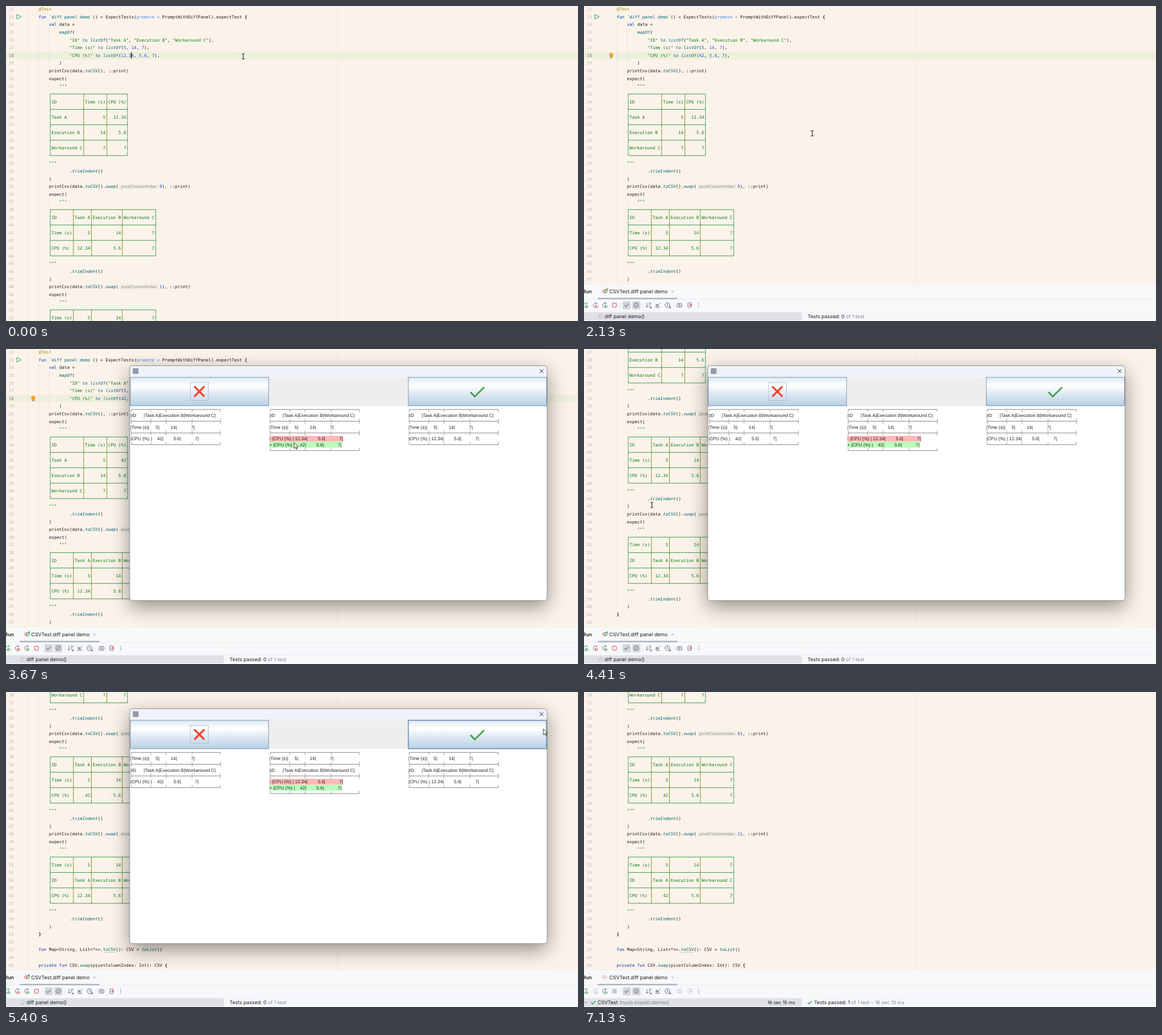
Recreate the animation shown at these times as an HTML page with a canvas. Size 1008 by 556 pixels, loop 7.64 s.

```html
<!DOCTYPE html>
<html lang="en">
<head>
<meta charset="utf-8">
<title>Diff panel demo</title>
<style>
html, body { margin: 0; width: 100%; height: 100%; overflow: hidden; background: #fbf3e9; }
canvas { display: block; width: 1008px; height: 556px; }
</style>
</head>
<body>
<canvas id="stage" width="1008" height="556"></canvas>
<script>
const ctx = document.getElementById('stage').getContext('2d');
const LOOP = 7640, W = 1008, H = 556;
const CW = 4.536, LH = 13.61, X0 = 39.4;
const MONO = '7.535px "DejaVu Sans Mono", monospace';
const UI = '8.75px Inter, sans-serif';
const ARIAL = '8.05px "Liberation Sans", Arial, sans-serif';
const INK = '#1b1b1b', GREEN = '#067d17', TEAL = '#00627a', BLUE = '#0033b3', GRAY = '#818594';
const RUN = '#3a9a56', RED = '#e0434f', ICON = '#6c707e', PALE = '#c4c7d0';

// timeline marks in ms
const MENU = 1150, LAUNCH = 1520, PANEL = 1600, DONE = 6480, SCROLL = 4140;
const DIALOGS = [
  { open: 2400, close: 3060, h: 49.5 },
  { open: 3120, close: 5210, h: 51, drag: [4690, 4890, 133, -5.7] },
  { open: 5400, close: 6400, h: 51, drag: [5560, 5750, 160, -8.7] },
];
const EDITS = ['12.3', '12.', '12', '1', '', '4', '42'];
const MOUSE = [
  [700, 250, 505], [1000, 60, 75], [1120, 20, 18], [1220, 21, 19], [1380, 39, 26], [1520, 39, 26],
  [2250, 430, 240], [2740, 759, 92], [2930, 828, 74], [3320, 828, 74],
  [4070, 119.5, 275.5], [4480, 119.5, 275.5], [4690, 560, 37], [4890, 693, 31],
  [5080, 947, 65], [5400, 947, 65], [5560, 618.5, 35.2], [5750, 778.5, 26.5],
  [5850, 778.5, 26.5], [6200, 985, 64], [6450, 985, 64], [6950, 822, 338], [7130, 990, 560],
];
const PRESSES = [[1140, 1210], [1450, 1520], [2985, 3060], [4690, 4890], [5140, 5210], [5560, 5800], [6330, 6400]];

const clamp = (v, a, b) => Math.max(a, Math.min(b, v));
const ease = p => p * p * (3 - 2 * p);
const within = (t, a, b) => t >= a && t < b;

function text(s, x, y, font, color, align = 'left') {
  ctx.font = font;
  ctx.fillStyle = color;
  ctx.textAlign = align;
  ctx.fillText(s, x, y);
  return ctx.measureText(s).width;
}
function rect(x, y, w, h, color) {
  ctx.fillStyle = color;
  ctx.fillRect(x, y, w, h);
}
function round(x, y, w, h, r, fill, stroke) {
  ctx.beginPath();
  ctx.roundRect(x, y, w, h, r);
  if (fill) { ctx.fillStyle = fill; ctx.fill(); }
  if (stroke) { ctx.strokeStyle = stroke; ctx.lineWidth = 1; ctx.stroke(); }
}
function shape(points, color, width = 1, fill, closed) {
  ctx.beginPath();
  points.forEach(([x, y], i) => i ? ctx.lineTo(x, y) : ctx.moveTo(x, y));
  if (closed) ctx.closePath();
  if (fill) { ctx.fillStyle = fill; ctx.fill(); }
  if (color) { ctx.strokeStyle = color; ctx.lineWidth = width; ctx.stroke(); }
}
function arc(x, y, r, color, width = 1, a = 0, b = Math.PI * 2) {
  ctx.beginPath();
  ctx.arc(x, y, r, a, b);
  ctx.strokeStyle = color;
  ctx.lineWidth = width;
  ctx.stroke();
}
function disc(x, y, r, color) {
  ctx.beginPath();
  ctx.arc(x, y, r, 0, Math.PI * 2);
  ctx.fillStyle = color;
  ctx.fill();
}
function shadowed(color, blur, dy, draw) {
  ctx.save();
  ctx.shadowColor = color;
  ctx.shadowBlur = blur;
  ctx.shadowOffsetY = dy;
  draw();
  ctx.restore();
}
const play = (x, y, s, color, fill) =>
  shape([[x - s * .8, y - s], [x + s, y], [x - s * .8, y + s]], color, 1, fill, true);
const tick = (x, y, s, color, w) =>
  shape([[x - s, y], [x - s * .3, y + s * .7], [x + s, y - s * .65]], color, w);

// ---- tables ----
function rowsOf(kind, cpu) {
  const rows = [['ID', 'Task A', 'Execution B', 'Workaround C'],
    ['Time (s)', '5', '14', '7'], ['CPU (%)', cpu, '5.6', '7']];
  if (kind === 0) return rows[0].map((_, c) => rows.map(r => r[c]));
  return kind === 1 ? rows : [rows[1], rows[0], rows[2]];
}
function layout(kind, cpu) {
  const rows = rowsOf(kind, cpu);
  const widths = rows[0].map((_, c) => Math.max(...rows.map(r => r[c].length)));
  const bars = [0];
  widths.forEach(w => bars.push(bars[bars.length - 1] + w + 1));
  const lines = rows.map(r => r.map((s, c) => c ? s.padStart(widths[c]) : s.padEnd(widths[c])));
  return { lines, bars };
}

// ---- editor ----
const yOf = n => 5.5 + (n - 12) * LH;
const TOKENS = /"""|"[^"]*"|`[^`]*`|@\w+|promote =|\b(?:fun|val|private)\b|\b(?:to|listOf|mapOf|toCSV|swap|trimIndent|toList)\b|\b\d[\d.]*|[{}]|[^"`@{}\w]+|\w+/g;

function style(tok, upright) {
  if (tok[0] === '"') return [GREEN, ''];
  if (tok[0] === '`') return [TEAL, ''];
  if (tok[0] === '@') return ['#9e880d', ''];
  if (tok === 'promote =') return ['#4a86e8', ''];
  if (/^(fun|val|private)$/.test(tok)) return [BLUE, ''];
  if (/^(to|listOf|mapOf|toCSV|swap|trimIndent|toList)$/.test(tok)) return [TEAL, upright ? '' : 'italic '];
  if (/^\d/.test(tok)) return ['#1750eb', ''];
  return [INK, /[{}]/.test(tok) ? 'bold ' : ''];
}
function code(n, col, s, x = X0 + col * CW) {
  const y = yOf(n) + 2.7, declares = /^(private )?fun /.test(s);
  for (const { 0: tok, index } of s.matchAll(TOKENS)) {
    const upright = declares && s[index - 1] === '.';
    const [color, face] = style(tok, upright);
    const tx = x + index * CW;
    text(tok, tx, y, face + MONO, color);
    if (upright && tok === 'toCSV') rect(tx, y + 2, 5 * CW, .6, '#9ab0b0');
  }
}
function codeTable(n, { lines, bars }) {
  const xs = bars.map(b => X0 + (8.5 + b) * CW), last = lines.length * 2;
  for (let k = 0; k <= last; k++) {
    const y = yOf(n + k), sep = k % 2 === 0;
    if (sep) rect(xs[0], y - .5, xs[xs.length - 1] - xs[0], 1, '#3f9a52');
    else lines[(k - 1) / 2].forEach((s, c) =>
      text(s, X0 + (9 + bars[c]) * CW, y + 2.7, MONO, GREEN));
    xs.forEach((x, i) => {
      const top = k === 0 ? 0 : -6.5, bottom = k === last ? 0 : 6.3;
      rect(x - .5, y + top, 1, bottom - top, i && i < xs.length - 1 ? '#75892a' : '#3a9468');
    });
  }
}
function block(n, kind, cpu) {
  if (kind) {
    const y = yOf(n), call = 'printCsv(data.toCSV().swap(';
    code(n, 8, call);
    round(199.5, y - 5, 69.5, 10, 3, '#f3eee6');
    text('pivotColumnIndex:', 203, y + 2.5, '7.3px Inter, sans-serif', '#8c8c8c');
    code(n, 0, kind - 1 + '), ::print)', 270.5);
  } else code(n, 8, 'printCsv(data.toCSV(), ::print)');
  code(n + 1, 8, 'expect(');
  code(n + 2, 12, '"""');
  const table = layout(kind, cpu), end = n + 4 + table.lines.length * 2;
  rect(75.5, yOf(n + 2) - 6.8, 1, LH, '#ece6dd');
  codeTable(n + 3, table);
  code(end, 8, '"""');
  code(end + 1, 16, '.trimIndent()');
  code(end + 2, 8, ')');
}
function editor(t) {
  rect(0, 0, W, H, '#fbf3e9');
  const notches = t < SCROLL ? 0 : clamp(Math.floor((t - SCROLL) / 67.5) + 1, 0, 6);
  ctx.save();
  ctx.translate(0, -notches * 3 * LH);
  rect(0, yOf(18) - 6.8, W, LH, '#eeefdc');
  rect(37.5, 0, 1, 1000, '#efe9df');
  rect(583.5, 0, 1, 1000, '#efe9df');
  rect(57, yOf(14) - 6.8, 1, 47 * LH, '#ece6dd');
  rect(75.5, yOf(15) - 6.8, 1, 5 * LH, '#ece6dd');
  for (let n = 12; n <= 70; n++)
    text(n, 5, yOf(n) + 2.7, '7.4px "DejaVu Sans Mono", monospace', n === 18 ? '#767a8a' : '#b4b7c2');
  play(22.5, yOf(13), 4.2, RUN, '#f2fcf3');

  const step = t < 120 ? -1 : clamp(Math.floor((t - 120) / 73.3), 0, 6);
  const cpu = step < 0 ? '12.34' : EDITS[step];
  code(12, 4, '@Test');
  code(13, 4, 'fun `diff panel demo`() = ExpectTests(promote = PromptWithDiffPanel).expectTest {');
  code(14, 8, 'val data =');
  code(15, 12, 'mapOf(');
  code(16, 16, '"ID" to listOf("Task A", "Execution B", "Workaround C"),');
  code(17, 16, '"Time (s)" to listOf(5, 14, 7),');
  code(18, 16, '"CPU (%)" to listOf(' + cpu + ', 5.6, 7),');
  code(19, 12, ')');
  if (t < LAUNCH) rect(X0 + (36 + (step < 0 ? 4 : cpu.length)) * CW - .5, yOf(18) - 5.5, 1.3, 11, '#000');
  if (t >= 560) {
    disc(48, yOf(18) - .8, 3.7, '#f5a524');
    rect(46.4, yOf(18) + 2.7, 3.2, 2, '#8a8578');
  }
  const accepted = i => t >= DIALOGS[i].close + (i === 1 ? 100 : 0) ? '42' : '12.34';
  block(20, 0, accepted(0));
  block(35, 1, accepted(1));
  block(48, 2, accepted(2));
  code(61, 4, '}');
  code(63, 4, 'fun Map<String, List<*>>.toCSV(): CSV = toList()');
  code(65, 4, 'private fun CSV.swap(pivotColumnIndex: Int): CSV {');
  ctx.restore();
}

// ---- context menu ----
function menu() {
  shadowed('rgba(0,0,0,.28)', 14, 5, () => round(23, 18.5, 204, 74.5, 6, '#fff'));
  round(23, 18.5, 204, 74.5, 6, '#fdfdfd', '#b9bdc9');
  round(27, 23, 195.5, 16, 3, '#cfdefc');
  const items = ["Run 'diff panel demo()'", "Debug 'diff panel demo()'",
    "Run 'diff panel demo()' with Coverage", 'Modify Run Configuration...'];
  const marks = [1, 0, 32];
  items.forEach((s, i) => {
    const y = 33.8 + i * 16.9;
    text(s, 45, y, UI, INK);
    if (i in marks) {
      const at = 45 + ctx.measureText(s.slice(0, marks[i])).width;
      rect(at, y + 1.2, ctx.measureText(s[marks[i]]).width, .8, INK);
    }
  });
  text('Ctrl+Maj+F10', 218.5, 33.8, UI, '#8b90a0', 'right');
  play(37, 30.5, 4, RUN, '#f2fcf3');
  arc(37, 48, 2.7, RUN);
  for (const d of [-2, 0, 2]) shape([[32.7, 48 + d * 1.5], [34.3, 48 + d]], RUN, .8),
    shape([[41.3, 48 + d * 1.5], [39.7, 48 + d]], RUN, .8);
  shape([[33.5, 60.5], [37, 59.3], [40.5, 60.5], [40.3, 65], [37, 68.5], [33.7, 65]], ICON, 1, '#fff', true);
  play(40, 66.5, 2, RUN, '#fff');
}

// ---- run panel ----
function rerun(x, color, dot) {
  arc(x, 528, 3.5, color, 1, .3, 5);
  shape([[x + .5, 523], [x + 3.2, 524.7], [x + .8, 526.7]], color);
  play(x + 2.5, 530.5, 2.4, dot, '#f7f8fa');
}
function toolbar(done) {
  rerun(3, RUN, RUN);
  rerun(20, done ? PALE : ICON, done ? PALE : RED);
  rerun(36.5, ICON, RUN);
  round(50.2, 524.6, 7, 7, 1, done ? PALE : '#fff2f2', done ? PALE : RED);
  for (const x of [68, 85]) round(x, 521, 14.5, 14.5, 3, '#d5d7dd');
  tick(75, 528, 3.7, ICON, 1.1);
  arc(92, 528, 3.9, ICON);
  shape([[89.4, 530.6], [94.6, 525.4]], ICON);
  for (const x of [63.5, 103, 158]) rect(x, 523, .8, 10, '#e3e5ea');
  shape([[111, 524], [111, 532], [109, 530], [111, 532], [113, 530]], ICON);
  [5, 3.6, 2.2].forEach((w, i) => rect(114, 524 + i * 2.7, w, 1, ICON));
  shape([[118.5, 530.5], [118.5, 533], [116, 533]], ICON, 1, ICON, true);
  shape([[134.5, 524], [129, 529.5], [129, 526], [129, 529.5], [132.5, 529.5]], ICON);
  shape([[127, 526], [127, 532], [134, 532]], ICON);
  arc(147, 528, 4.2, ICON);
  shape([[147, 525.5], [147, 528.3], [149, 529.5]], ICON);
  shape([[152.5, 530.5], [152.5, 533], [150, 533]], ICON, 1, ICON, true);
  const shot = done ? PALE : ICON;
  round(164, 525, 8.5, 6.5, 1.5, null, shot);
  arc(168.2, 528.2, 1.6, shot);
  round(183, 524, 6, 8, 1, null, shot);
  shape([[184.5, 528], [189.5, 528], [187.5, 526], [189.5, 528], [187.5, 530]], done ? PALE : RED);
  for (const d of [-3, 0, 3]) disc(202, 528 + d, .8, ICON);
}
function spinner(x, y, t) {
  const lead = Math.floor(t / 90) % 8;
  for (let i = 0; i < 8; i++) {
    const a = i * Math.PI / 4, c = Math.cos(a), s = Math.sin(a);
    const shade = .25 + .55 * ((i - lead + 8) % 8) / 7;
    shape([[x + c * 2, y + s * 2], [x + c * 4, y + s * 4]], `rgba(108,112,126,${shade})`);
  }
}
function panel(t) {
  const done = t >= DONE, y = 551.3;
  rect(0, 490, W, 66, '#f7f8fa');
  rect(0, 490, W, .8, '#ebecf0');
  rect(0, 517, W, 1, '#ebecf0');
  rect(0, 540, W, .8, '#ebecf0');
  text('Run', -2.5, 507, '600 ' + UI, INK);
  shape([[36, 500], [32, 503.5], [36, 507]], done ? '#e6a9ad' : RED, 1, '#fdeeee', true);
  shape([[38, 500], [42, 503.5], [38, 507]], done ? '#c9cbd2' : RUN, 1, '#f4faf5', true);
  if (!done) disc(40.5, 500, 1.7, '#55b86b');
  text('CSVTest.diff panel demo', 44.5, 507, UI, INK);
  shape([[153.8, 501.8], [158.2, 506.2]], '#a8adbd', .8);
  shape([[153.8, 506.2], [158.2, 501.8]], '#a8adbd', .8);
  round(24, 515.2, 141, 2.2, 1, '#a8adbd');
  toolbar(done);
  round(-5, 541, 389, 14, 3, '#dfe1e5');
  let x = 394;
  if (done) {
    shape([[1, 547], [3, 549], [5, 547]], ICON);
    tick(16.5, 548, 3.7, RUN, 1.4);
    const w = text('CSVTest', 24, y, UI, INK);
    text('(nyub.expekt.demos)', 24 + w + 3, y, UI, GRAY);
    text('16 sec 15 ms', 372, y, '8.2px Inter, sans-serif', INK, 'right');
    tick(398, 548, 3.7, RUN, 1.4);
    x = 405.5;
  } else {
    spinner(29, 548, t);
    text('diff panel demo()', 36, y, UI, INK);
  }
  const w = text('Tests passed: ' + (done ? 1 : 0), x, y, UI, INK);
  text(' of 1 test' + (done ? ' – 16 sec 15 ms' : ''), x + w, y, UI, GRAY);
  rect(0, 555, W, 1, '#fff');
}

// ---- diff dialog ----
function frameOf(d, t) {
  if (!d.drag) return [218, 29.5];
  const [a, b, dx, dy] = d.drag, p = ease(clamp((t - a) / (b - a), 0, 1));
  return [218 + dx * p, 29.5 + dy * p];
}
function button(x, y, h, hover) {
  const g = ctx.createLinearGradient(0, y, 0, y + h);
  [[0, '#dde8f3'], [.3, '#fff'], [.6, '#dde8f3'], [1, '#b8cfe5']].forEach(s => g.addColorStop(...s));
  rect(x, y, 244.5, h, g);
  ctx.strokeStyle = hover ? '#6e90b4' : '#7f97b0';
  ctx.lineWidth = hover ? 1.6 : 1;
  ctx.strokeRect(x + .5, y + .5, 243.5, h - 1);
}
function rule(x, y, bars, edge) {
  const u = 3.83, end = bars[bars.length - 1];
  rect(x + u / 2, y - .4, end * u, .9, '#77777b');
  bars.forEach((b, i) => {
    const top = edge < 0 ? 0 : -4.5, bottom = edge > 0 ? 0 : 4.5;
    rect(x + (b + .5) * u - .4, y + top, .9, bottom - top, i && i < bars.length - 1 ? '#a89478' : '#888b92');
  });
}
function diffTable(x, y, kind, side) {
  const line = l => '|' + l.join('|') + '|';
  const fresh = layout(kind, '42'), old = layout(kind, '12.34'), { bars } = fresh;
  const row = (s, mark) => {
    ctx.font = ARIAL;
    if (mark) rect(x, y - 5.2, ctx.measureText(s).width + .5, 10.4, mark);
    text(s, x + .3, y + 2.9, ARIAL, '#222');
    y += 10.35;
  };
  rule(x, y, bars, -1);
  y += 10.35;
  fresh.lines.forEach((l, i) => {
    const now = line(l), was = line(old.lines[i]);
    if (side === 1 && now !== was) {
      row('- ' + was, '#ffb9b9');
      row('+ ' + now, '#b9ffb9');
    } else row(side === 2 ? was : now);
    rule(x, y, bars, i === fresh.lines.length - 1 ? 1 : 0);
    y += 10.35;
  });
}
function dialog(d, kind, t, mouse) {
  const [x, y] = frameOf(d, t), w = 735.5, h = 414.5;
  shadowed('rgba(0,0,0,.42)', 34, 11, () => round(x, y, w, h, 5, '#fff'));
  ctx.save();
  ctx.beginPath();
  ctx.roundRect(x, y, w, h, 5);
  ctx.clip();
  rect(x, y, w, h, '#fff');
  rect(x, y, w, 20, '#eff3f9');
  rect(x, y + 20, w, d.h, '#eee');
  const by = y + 20, cy = by + d.h / 2;
  button(x + .7, by, d.h, false);
  const rx = x + 490.5;
  button(rx, by, d.h, mouse && mouse[0] > rx && mouse[1] > by && mouse[1] < by + d.h);
  ctx.strokeStyle = '#a9c0d8';
  ctx.lineWidth = 1;
  ctx.strokeRect(x + 107, cy - 16, 31.5, 31.5);
  const mx = x + 122.7;
  shape([[mx - 9, cy - 9], [mx + 9, cy + 9]], '#f0452d', 3.2);
  shape([[mx - 9, cy + 9], [mx + 9, cy - 9]], '#f0452d', 3.2);
  shape([[x + 600.5, cy + 1], [x + 608, cy + 9], [x + 624.5, cy - 7.5]], '#43a047', 2.8);
  rect(x + 5.5, y + 4.5, 10, 10, '#929baa');
  shape([[x + 722.5, y + 6.3], [x + 728.8, y + 12.6]], INK);
  shape([[x + 722.5, y + 12.6], [x + 728.8, y + 6.3]], INK);
  for (let side = 0; side < 3; side++)
    diffTable(x + .8 + side * 244.9, by + d.h + 6.2, kind, side);
  ctx.restore();
  round(x, y, w, h, 5, null, 'rgba(95,98,105,.65)');
}

// ---- pointer ----
function mouseAt(t) {
  if (t < 120) return [418, 89];
  if (t < MOUSE[0][0] || t >= 7125) return null;
  const i = MOUSE.findIndex(k => k[0] > t), [ta, xa, ya] = MOUSE[i - 1], [tb, xb, yb] = MOUSE[i];
  const p = ease((t - ta) / (tb - ta));
  return [xa + (xb - xa) * p, ya + (yb - ya) * p];
}
function arrow(x, y) {
  shape([[x, y], [x, y + 10.5], [x + 2.4, y + 8.3], [x + 4, y + 12], [x + 5.7, y + 11.2],
    [x + 4.1, y + 7.7], [x + 7.2, y + 7.5]], '#222', .9, '#fff', true);
}
function beam(x, y) {
  rect(x - .5, y - 4.5, 1.1, 9, '#222');
  rect(x - 2.5, y - 5, 5, 1, '#222');
  rect(x - 2.5, y + 4, 5, 1, '#222');
}
function pointer(t, mouse, box, menuOpen) {
  const [x, y] = mouse;
  const inside = box && x > box[0] && x < box[0] + 735.5 && y > box[1] && y < box[1] + 414.5;
  if (PRESSES.some(([a, b]) => within(t, a, b))) disc(x, y + 1.5, 8, 'rgba(248,222,40,.85)');
  if (inside || menuOpen || x < 38 || (t >= PANEL && y > 490)) arrow(x, y);
  else beam(x, y);
}

function draw(t) {
  ctx.textRendering = 'geometricPrecision';
  const mouse = mouseAt(t), menuOpen = within(t, MENU, LAUNCH);
  editor(t);
  if (t >= PANEL) panel(t);
  if (menuOpen) menu();
  const kind = DIALOGS.findIndex(d => within(t, d.open, d.close));
  const shown = DIALOGS[kind];
  if (shown) dialog(shown, kind, t, mouse);
  if (mouse) pointer(t, mouse, shown && frameOf(shown, t), menuOpen);
}
function tickFrame() {
  draw(performance.now() % LOOP);
  requestAnimationFrame(tickFrame);
}
tickFrame();
</script>
</body>
</html>
```
